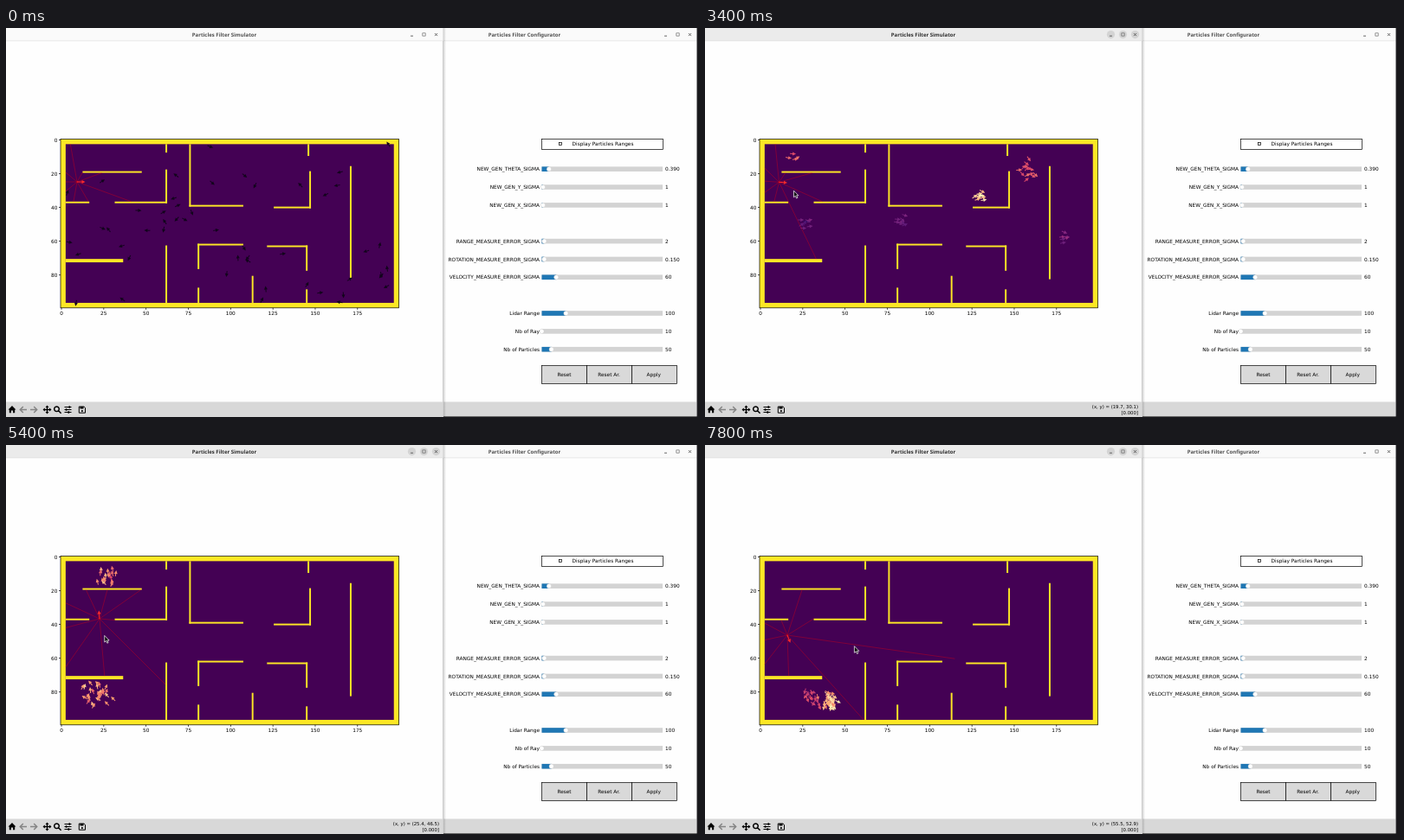
An HTML page with a canvas that plays this animation: 800 by 450 pixels, repeating every 8000 ms.

```html
<!DOCTYPE html>
<html lang="en">
<head>
<meta charset="utf-8">
<title>Particles Filter</title>
<style>
html, body { margin: 0; width: 100%; height: 100%; overflow: hidden; background: #fefefe; }
canvas { display: block; width: 800px; height: 450px; }
</style>
</head>
<body>
<canvas id="stage" width="800" height="450"></canvas>
<script>
const ctx = document.getElementById('stage').getContext('2d');
const LOOP = 8000, STEP = 200, RAD = Math.PI / 180;
const LEFT = 63, TOP = 128.5, CELL = 1.953, COLS = 200, ROWS = 100, BORDER = 3;
const LIDAR_RANGE = 100 * CELL, PARTICLES = 50;
const PLOT_FONT = '"DejaVu Sans", sans-serif';

const cells = (col, row, w, h) => [LEFT + col * CELL, TOP + row * CELL, w * CELL, h * CELL];
const across = (row, from, to, thick = 1) => cells(from, row, to - from, thick);
const down = (col, from, to) => cells(col, from, 1, to - from);
const frameBox = cells(0, 0, COLS, ROWS);
const room = cells(BORDER, BORDER, COLS - 2 * BORDER, ROWS - 2 * BORDER);
const walls = [
  across(19, 13, 48), across(37, 3, 17), across(37, 32, 63), across(39, 76, 108), across(40, 126, 148),
  across(62, 81, 108), across(63, 122, 146), across(71, 3, 37, 2),
  down(62, 3, 8), down(62, 18, 38), down(62, 63, 97), down(76, 3, 40), down(81, 62, 77), down(81, 88, 97),
  down(113, 81, 97), down(145, 63, 78), down(145, 89, 97), down(146, 3, 10), down(147, 19, 41), down(171, 16, 83)
];

// time, x, y, heading in degrees
const robotKeys = [
  [3000, 82, 178, 0], [4000, 92, 179, 12], [5400, 108, 201, -95], [6400, 103, 203, -180], [7800, 95, 220, -292]
];
const cursorKeys = [
  [2000, 130, 240], [2400, 114.4, 204.4], [3000, 102.5, 188.2], [4000, 102.5, 188.2],
  [5200, 113.6, 220.2], [6400, 115.4, 223.1], [7400, 172.4, 232.7]
];

// Swarms that survive each resampling: x, y, radius, count, heat
const generations = [
  { start: 3000, key: 4000, swarms: [
    [374, 168, 8, 14, .6], [319, 195, 5, 10, .88], [227, 226, 6, 8, .36],
    [119, 225, 6, 8, .34], [416, 243, 6, 6, .38], [104, 149, 4, 4, .75]] },
  { start: 4600, key: 5400, swarms: [[117, 157, 7, 18, .74], [106, 292, 12, 32, .74]] },
  { start: 5800, key: 6400, swarms: [[100, 139, 4, 3, .6], [112, 174, 7, 5, .45], [105, 296, 12, 42, .74]] },
  { start: 7000, key: 7800, swarms: [[142, 293, 7, 34, .85], [122, 290, 8, 16, .6]] }
];

const heatStops = [[0, 0, 4], [59, 15, 112], [140, 41, 129], [222, 73, 104], [254, 159, 109], [252, 253, 191]];

// label, shown value, filled share of the track
const sliders = [
  ['NEW_GEN_THETA_SIGMA', '0.390', .06], ['NEW_GEN_Y_SIGMA', '1', .01], ['NEW_GEN_X_SIGMA', '1', .01],
  ['RANGE_MEASURE_ERROR_SIGMA', '2', .02], ['ROTATION_MEASURE_ERROR_SIGMA', '0.150', .02],
  ['VELOCITY_MEASURE_ERROR_SIGMA', '60', .12],
  ['Lidar Range', '100', .2], ['Nb of Ray', '10', 0], ['Nb of Particles', '50', .08]
];

const mix = (a, b, k) => a + (b - a) * k;
const ease = k => k * k * (3 - 2 * k);

function sample(keys, t) {
  const next = keys.findIndex(k => k[0] > t);
  if (next === 0) return keys[0].slice(1);
  if (next < 0) return keys[keys.length - 1].slice(1);
  const a = keys[next - 1], b = keys[next], k = ease((t - a[0]) / (b[0] - a[0]));
  return a.map((v, i) => mix(v, b[i], k)).slice(1);
}

function seeded(seed) {
  return () => (seed = (seed * 16807) % 2147483647) / 2147483647;
}

function heatColor(heat) {
  const p = Math.max(0, Math.min(.999, heat)) * (heatStops.length - 1), i = Math.floor(p);
  return `rgb(${heatStops[i].map((v, c) => Math.round(mix(v, heatStops[i + 1][c], p - i)))})`;
}

function rect(x, y, w, h, fill, stroke) {
  if (fill) { ctx.fillStyle = fill; ctx.fillRect(x, y, w, h); }
  if (stroke) { ctx.strokeStyle = stroke; ctx.lineWidth = .7; ctx.strokeRect(x, y, w, h); }
}

function disc(x, y, r, fill, stroke) {
  ctx.beginPath();
  ctx.arc(x, y, r, 0, Math.PI * 2);
  ctx.fillStyle = fill;
  ctx.fill();
  if (stroke) { ctx.strokeStyle = stroke; ctx.lineWidth = .4; ctx.stroke(); }
}

function path(d, color, width) {
  const p = new Path2D(d);
  if (width) { ctx.strokeStyle = color; ctx.lineWidth = width; ctx.stroke(p); }
  else { ctx.fillStyle = color; ctx.fill(p); }
}

function text(s, x, y, align = 'center', font = '5.8px ' + PLOT_FONT, color = '#000') {
  ctx.font = font;
  ctx.textRendering = 'geometricPrecision';
  ctx.textAlign = align;
  ctx.fillStyle = color;
  ctx.fillText(s, x, y + 2.1);
}

function titleBar(x, w, title, titleX, focused) {
  rect(x, 0, w, 15, focused ? '#ebebeb' : '#fafafa');
  rect(x, 14.6, w, .6, '#dcdcdc');
  text(title, titleX, 7.8, 'center', 'bold 6px "Noto Sans", sans-serif', focused ? '#303030' : '#505050');
  const [min, max, close] = [36, 22, 8].map(inset => x + w - inset);
  if (focused) [min, max, close].forEach(b => disc(b, 7.6, 4.6, '#d3d3d3'));
  path(`M${min - 1.5} 9.2h3`, '#444', .8);
  path(`M${max - 1.7} 5.8h3.4v3.400h-3.400z`, '#555', .6);
  path(`M${close - 1.5} 6.100l3 3m0 -3l-3 3`, '#444', .8);
}

function toolbarIcons() {
  path('M2.5 441.5L7 437l4.500 4.500h-1.300v3.700h-2.200v-2.700h-2v2.700h-2.200v-3.700z', '#000');
  path('M24 441.500h-7M19.800 438l-3.500 3.500 3.500 3.500', '#858585', 1.5);
  path('M28 441.500h7M32.200 438l3.500 3.500-3.500 3.500', '#858585', 1.5);
  path('M43.500 441.500h8M47.500 437.500v8', '#000', 1.3);
  path('M42.500 441.500l2.400-2v4zM52.500 441.500l-2.400-2v4zM47.500 436.500l-2 2.400h4zM47.500 446.500l-2-2.400h4z', '#000');
  path('M61.300 440.700a2.800 2.800 0 1 1-5.600 0a2.800 2.800 0 1 1 5.600 0M60.600 442.800l3 3', '#000', 1.5);
  path('M67.500 438.500h8M67.500 441.500h8M67.500 444.500h8', '#000', 1);
  path('M72.500 437.200h1.600v2.600h-1.600zM68.800 440.200h1.600v2.600h-1.600zM71.500 443.200h1.600v2.600h-1.600z', '#000');
  path('M84.300 438h5.800l1.400 1.400v5.800h-7.200z', '#000', 1);
  path('M85.500 438h4v2.500h-4z', '#000');
  disc(87.9, 443, 1.1, '#000');
}

function drawSlider([label, value, share], i) {
  const y = 163.2 + 20.85 * (i + Math.floor(i / 3));
  const start = 618.5, width = 139.5, end = start + width * share;
  rect(start, y - 2.8, width, 5.6, '#d3d3d3');
  rect(start, y - 2.8, end - start, 5.6, '#1f77b4');
  disc(end, y, 2.6, '#fff', '#c0c0c0');
  text(label, 616, y, 'right');
  text(value, 761, y, 'left');
}

function drawConfigurator() {
  titleBar(505, 292.5, 'Particles Filter Configurator', 598.5, false);
  rect(618.5, 128.5, 140, 12, '#fff', '#000');
  rect(638.5, 132.5, 3, 3, '#fff', '#000');
  text('Display Particles Ranges', 689, 134);
  sliders.forEach(drawSlider);
  ['Reset', 'Reset Ar.', 'Apply'].forEach((label, i) => {
    rect(618.5 + i * 52, 390.5, 52, 21, '#d9d9d9', '#000');
    text(label, 644.5 + i * 51.6, 400.6);
  });
  rect(505, 432.5, 292, 16.5, '#d8d8d8');
  rect(505, 449, 295, 1, '#666');
  rect(797.5, 0, 2.5, 450, '#1b1a1e');
  const shadow = ctx.createLinearGradient(504, 0, 508, 0);
  shadow.addColorStop(0, 'rgba(0,0,0,.22)');
  shadow.addColorStop(1, 'rgba(0,0,0,0)');
  rect(504, 0, 4, 450, shadow);
}

function drawMap() {
  rect(...frameBox, '#fde725');
  rect(...room, '#440154');
  walls.forEach(w => rect(...w, '#fde725'));
  rect(...frameBox, null, '#000');
  for (let v = 0; v < COLS; v += 25) {
    const x = LEFT + (v + .5) * CELL;
    rect(x - .3, TOP + ROWS * CELL, .7, 2, '#000');
    text(v, x, 330.2);
  }
  for (let v = 0; v < ROWS; v += 20) {
    const y = TOP + (v + .5) * CELL;
    rect(LEFT - 2, y - .3, 2, .7, '#000');
    text(v, 59.5, y, 'right');
  }
}

function arrow(x, y, angle, color, length) {
  ctx.save();
  ctx.translate(x, y);
  ctx.rotate(angle * RAD);
  const neck = length - 4;
  path(`M0 -.5H${neck}V-2L${length} 0L${neck} 2V.5H0z`, color);
  ctx.restore();
}

// Distances at which a ray enters and leaves a box
function slab(x, y, dx, dy, [bx, by, w, h]) {
  const tx = [(bx - x) / dx, (bx + w - x) / dx], ty = [(by - y) / dy, (by + h - y) / dy];
  return [Math.max(Math.min(...tx), Math.min(...ty)), Math.min(Math.max(...tx), Math.max(...ty))];
}

function drawRobot([x, y, heading]) {
  for (let i = 0; i < 9; i++) {
    const a = (heading - 180 + i * 40 + .01) * RAD, dx = Math.cos(a), dy = Math.sin(a);
    let reach = Math.min(LIDAR_RANGE, slab(x, y, dx, dy, room)[1]);
    for (const wall of walls) {
      const [near, far] = slab(x, y, dx, dy, wall);
      if (near > 0 && near <= far) reach = Math.min(reach, near);
    }
    path(`M${x} ${y}L${x + dx * reach} ${y + dy * reach}`, 'rgba(255,0,0,.45)', .7);
  }
  arrow(x, y, heading, '#ff2a2a', 9.5);
}

function drawParticles(t, robot) {
  const generation = generations.filter(g => g.start <= t).pop();
  const random = seeded(generation ? generation.key : 4242);
  if (!generation) {
    const [x, y, w, h] = room;
    for (let i = 0; i < PARTICLES; i++) {
      arrow(x + random() * w, y + random() * h, random() * 360, '#12051c', 7);
    }
    return;
  }
  // Particles repeat the robot's motion in their own frame of reference.
  const [keyX, keyY, keyHeading] = sample(robotKeys, generation.key);
  const moveX = robot[0] - keyX, moveY = robot[1] - keyY;
  const spread = () => 1.3 * (random() + random() + random() - 1.5);
  for (const [cx, cy, radius, count, heat] of generation.swarms) {
    for (let i = 0; i < count; i++) {
      const offset = spread() * 40, c = Math.cos(offset * RAD), s = Math.sin(offset * RAD);
      const x = cx + spread() * radius + moveX * c - moveY * s;
      const y = cy + spread() * radius + moveX * s + moveY * c;
      arrow(x, y, robot[2] + offset, heatColor(heat + spread() * .1), 7);
    }
  }
}

function drawCursor(t) {
  if (t < cursorKeys[0][0]) return;
  const [x, y] = sample(cursorKeys, t), [lastX, lastY] = sample(cursorKeys, t - STEP);
  const outline = `M${x} ${y}v7.600l1.800-1.500 1.300 2.700 1.300-.6-1.300-2.600h2.300z`;
  path(outline, '#111');
  path(outline, '#fff', .7);
  const font = '5.35px ' + PLOT_FONT;
  const value = (p, start) => ((p - start) / CELL - .5).toFixed(1);
  text(`(x, y) = (${value(lastX, LEFT)}, ${value(lastY, TOP)})`, 500, 437.5, 'right', font);
  text('[0.000]', 500, 444.5, 'right', font);
}

function draw(t) {
  const robot = sample(robotKeys, t);
  rect(0, 0, 800, 450, '#fefefe');
  drawConfigurator();
  titleBar(0, 504.5, 'Particles Filter Simulator', 252, t >= 2800);
  rect(0, 432.5, 504.5, 17.5, '#d8d8d8');
  toolbarIcons();
  drawMap();
  drawParticles(t, robot);
  drawRobot(robot);
  drawCursor(t);
}

function frame(now) {
  draw(Math.floor((now % LOOP) / STEP) * STEP);
  requestAnimationFrame(frame);
}
requestAnimationFrame(frame);
</script>
</body>
</html>
```
